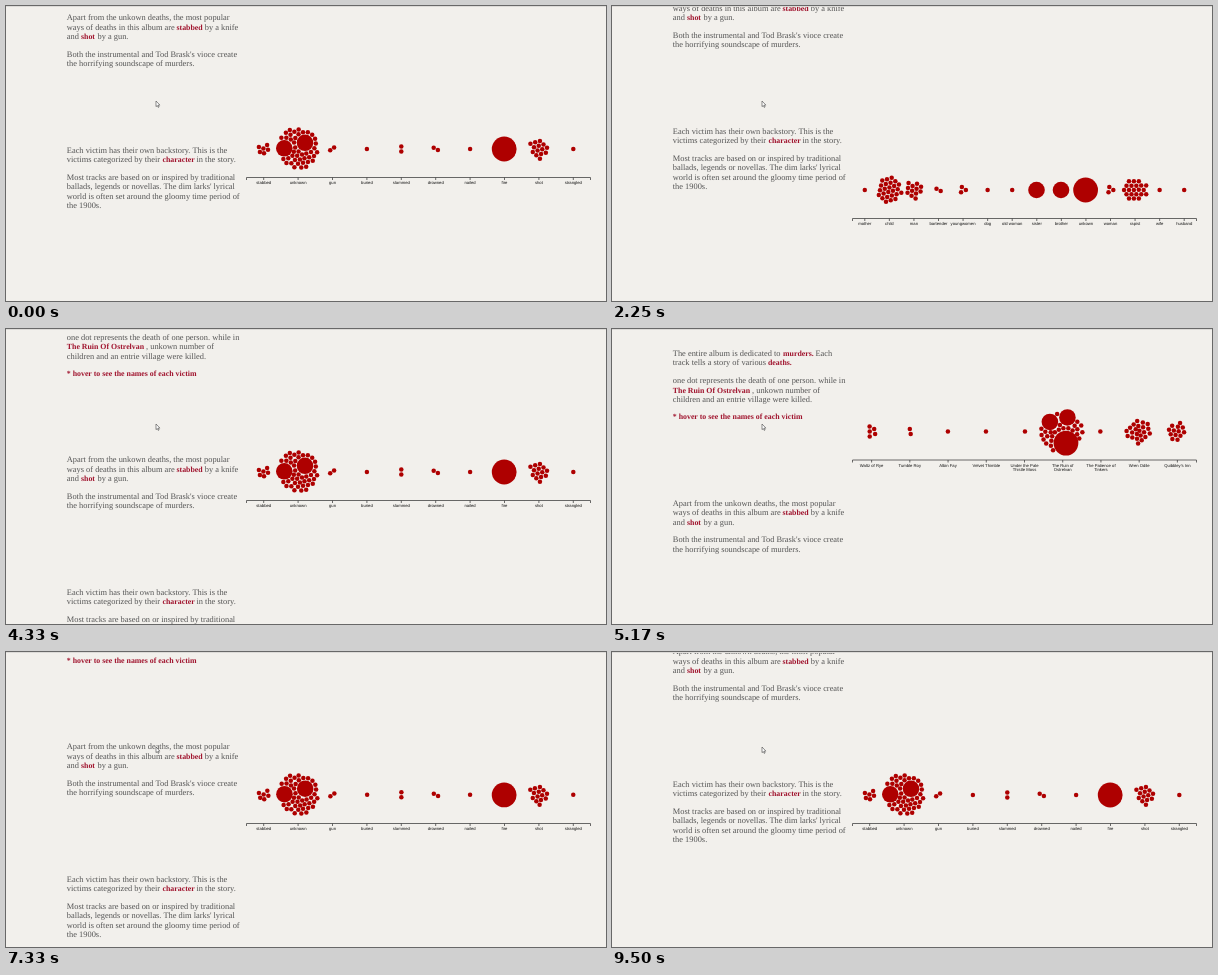
An HTML page for the animation above (9580 ms loop, 600x295 px).

```html
<!DOCTYPE html>
<html lang="en">
<head>
<meta charset="utf-8">
<title>Scrolling beeswarm story</title>
<style>
html, body { margin: 0; width: 100%; height: 100%; overflow: hidden; background: #f2f0ec; }
svg { display: block; width: 100%; height: 100%; text-rendering: geometricPrecision; }
.story { font: 8.4px "Liberation Serif", "Times New Roman", serif; fill: #555; }
.story .key { font-weight: bold; font-size: 7.85px; fill: #a0142e; }
.axis text { font: 4.2px "Liberation Sans", Arial, sans-serif; fill: #111; text-anchor: middle; }
.axis path { fill: none; stroke: #444; stroke-width: .8; }
.dots { fill: #ae0000; }
</style>
</head>
<body>
<svg id="stage" viewBox="0 0 600 295">
  <g class="story" id="story"></g>
  <g id="axes"></g>
  <g class="dots" id="dots"></g>
  <path d="M0 .5H600" stroke="#dddbd8"/>
  <path d="M150 95v5.6l1.3-1.1.9 1.9.9-.4-.9-1.9h1.7z" fill="#fff" stroke="#444" stroke-width=".6"/>
</svg>
<script>
const LOOP = 9580, STEP = 1000 / 12;
const LEFT = 240.5, RIGHT = 584.5, DOT = 2.25, GAP = 4.95;
const $ = id => document.getElementById(id);

function add(parent, tag, attrs, text) {
  const el = document.createElementNS("http://www.w3.org/2000/svg", tag);
  for (const name in attrs) el.setAttribute(name, attrs[name]);
  if (text) el.textContent = text;
  parent.appendChild(el);
  return el;
}

// Each line: offset from the second section, then runs; "*" marks a key run, a number sets x.
const lines = [
  [-150, "The entire album is dedicated to", 171, "*murders.", 203.5, "Each"],
  [-140.5, "track tells a story of various", 156, "*deaths."],
  [-122.5, "one dot represents the death of one person. while in"],
  [-113, "*The Ruin Of Ostrelvan", 140, ", unkown number of"],
  [-103.5, "children and an entrie village were killed."],
  [-86.5, "** hover to see the names of each victim"],
  [0, "Apart from the unkown deaths, the most popular"],
  [9.5, "ways of deaths in this album are", 170.5, "*stabbed", 198.8, "by a knife"],
  [19, "and", 75, "*shot", 91.5, "by a gun."],
  [36.5, "Both the instrumental and Tod Brask's vioce create"],
  [46, "the horrifying soundscape of murders."],
  [132.5, "Each victim has their own backstory. This is the"],
  [142, "victims categorized by their", 156.5, "*character", 190.5, "in the story."],
  [159.5, "Most tracks are based on or inspired by traditional"],
  [169, "ballads, legends or novellas. The dim larks' lyrical"],
  [178.5, "world is often set around the gloomy time period of"],
  [188, "the 1900s."]
];
for (const [y, ...runs] of lines) {
  let x = 60.8;
  for (const run of runs) {
    if (typeof run === "number") { x = run; continue; }
    const key = run[0] === "*";
    add($("story"), "text", { x, y: y + 3.2, class: key ? "key" : "" }, key ? run.slice(1) : run);
  }
}

// A group is a dot count or a list of offsets; big gives the three large circles.
const one = [[0, 0]], pair = [[-2, -1.2], [2.2, 1.2]], stack = [[0, -2.5], [0, 2.5]];
const trio = [[-1.2, -2.8], [2.8, 0], [-2, 2.4]];
const charts = [
  {
    axis: 131, stride: 17,
    labels: ["Waltz of Rye", "Tumble Roy", "Albin Fay", "Velvet Thimble", "Under the Pale|Thistle Moss",
      "The Ruin of|Ostrelvan", "The Patience of|Tinkers", "Wren Odile", "Quibbley's Inn"],
    groups: [[[-2, -5], [2.5, -2.5], [-2, 0], [2.5, 2.5], [-2, 5]], stack, one, one, one, 25, one, 22, 13],
    big: [[438.5, 92.8], [456, 88.3], [453.8, 114]]
  },
  {
    axis: 171.5, stride: 1,
    labels: ["stabbed", "unknown", "gun", "buried", "slammed", "drowned", "nailed", "fire", "shot", "strangled"],
    groups: [[[-4.8, -1.8], [3.4, -4], [-.3, -.3], [-3.8, 3], [4.3, .8], [.3, 4.3]], 42,
      [[-2.3, 1.3], [1.6, -1.4]], one, stack, pair, one, [], 14, one],
    big: [[278.3, 142.3], [299, 136.8], [498.2, 143]]
  },
  {
    axis: 212.5, stride: 29,
    labels: ["mother", "child", "man", "bartender", "youngwomen", "dog", "old woman", "sister", "brother",
      "unkown", "woman", "rapist", "wife", "husband"],
    groups: [one, 25, 12, pair, trio, one, one, [], [], [], trio, 21, one, one],
    big: [[424.5, 184], [449, 184], [473.6, 184]]
  }
];
const radii = [8.3, 8.3, 12.4];

// Pulls dots to a centre while keeping them apart and clear of the large circles.
function pack(cx, cy, count, big) {
  const pts = Array.from({ length: count }, (_, i) => {
    const r = 3 * Math.sqrt(i + .5), a = i * 2.39996;
    return [cx + r * Math.cos(a), cy + r * Math.sin(a)];
  });
  for (let n = 0; n < 600; n++) {
    const pull = .005 + .035 * (1 - n / 600);
    for (const p of pts) {
      p[0] += (cx - p[0]) * pull;
      p[1] += (cy - p[1]) * pull;
    }
    pts.forEach((p, i) => {
      for (let j = 0; j < i; j++) {
        const q = pts[j], dx = p[0] - q[0], dy = p[1] - q[1], d = Math.hypot(dx, dy) || .01;
        if (d >= GAP) continue;
        const k = (GAP - d) / d / 2;
        p[0] += dx * k; p[1] += dy * k;
        q[0] -= dx * k; q[1] -= dy * k;
      }
      big.forEach((b, j) => {
        const dx = p[0] - b[0], dy = p[1] - b[1], d = Math.hypot(dx, dy) || .01;
        const min = radii[j] + DOT + .3;
        if (d < min) {
          p[0] += dx * (min / d - 1);
          p[1] += dy * (min / d - 1);
        }
      });
    });
  }
  return pts;
}

for (const chart of charts) {
  const { axis, labels, groups, big, stride } = chart;
  const band = (RIGHT - LEFT) / labels.length, cy = axis - 28.6;
  const g = chart.el = add($("axes"), "g", { class: "axis" });
  let path = `M${LEFT} ${axis + 2.5}V${axis}H${RIGHT}v2.5`;
  const spots = [];
  labels.forEach((label, i) => {
    const cx = LEFT + band * (i + .5), group = groups[i];
    path += `M${cx} ${axis}v2.5`;
    label.split("|").forEach((part, row) => add(g, "text", { x: cx, y: axis + 6.6 + row * 4.5 }, part));
    spots.push(...(typeof group === "number"
      ? pack(cx, cy, group, big)
      : group.map(([x, y]) => [cx + x, cy + y])));
  });
  add(g, "path", { d: path });
  chart.spots = [...big, ...spots.map((_, i) => spots[i * stride % spots.length])];
}

const dots = charts[0].spots.map((_, i) => add($("dots"), "circle", { r: i < 3 ? radii[i] : DOT }));

// [step, scroll position]
const scroll = [[0, 11], [10, -12], [11, -12], [16, -18], [26, -18], [27, -8], [38, 80], [52, 130],
  [63, 178], [73, 148], [84, 98], [85, 98], [88, 94], [98, 65], [106, 41], [108, 41], [114, -1], [115, -1]];
// [step, chart shown from then on]
const scenes = [[-99, 1], [3.5, 2], [27.5, 1], [52.5, 0], [76.5, 1]];

function scrollAt(s) {
  const i = scroll.findIndex(k => k[0] > s), [s0, y0] = scroll[i - 1], [s1, y1] = scroll[i];
  return y0 + (y1 - y0) * (s - s0) / (s1 - s0);
}

function draw(ms) {
  const s = Math.min(114, Math.floor(ms / STEP + .06));
  $("story").setAttribute("transform", `translate(0 ${scrollAt(s).toFixed(2)})`);

  const n = scenes.filter(k => k[0] <= s).length - 1;
  const [start, shown] = scenes[n];
  const from = charts[scenes[Math.max(0, n - 1)][1]].spots, to = charts[shown].spots;
  const p = 1 - Math.exp((start - s) / 1.7);
  charts.forEach((c, i) => c.el.setAttribute("visibility", i === shown ? "visible" : "hidden"));
  dots.forEach((dot, i) => {
    dot.setAttribute("cx", (from[i][0] + (to[i][0] - from[i][0]) * p).toFixed(2));
    dot.setAttribute("cy", (from[i][1] + (to[i][1] - from[i][1]) * p).toFixed(2));
  });
}

const t0 = performance.now();
function tick() {
  draw((performance.now() - t0) % LOOP);
  requestAnimationFrame(tick);
}
tick();
</script>
</body>
</html>
```
